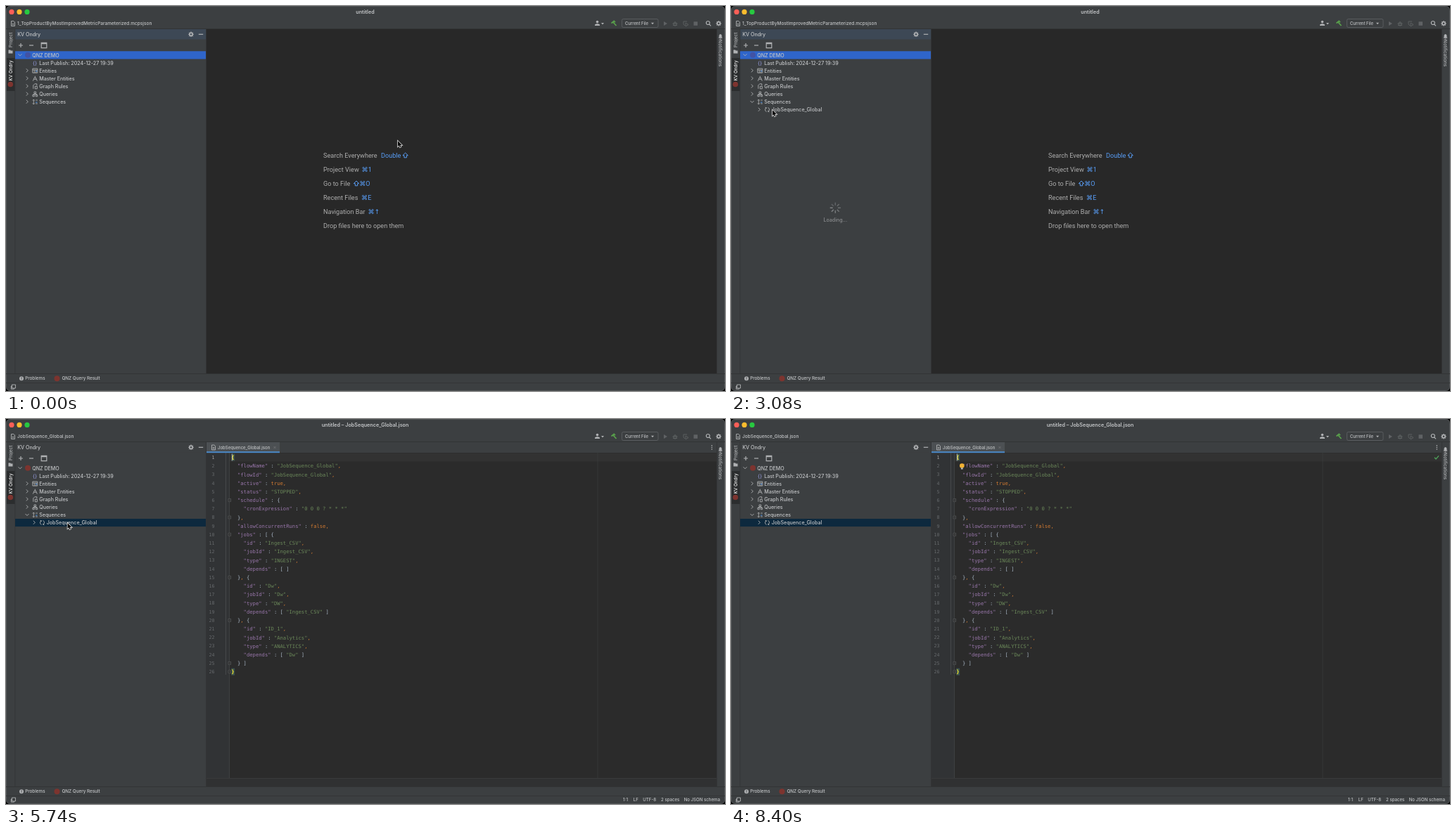
Recreate the animation shown at these times as an HTML page with a canvas. Size 1022 by 548 pixels, loop 8.47 s.

```html
<!DOCTYPE html>
<html lang="en">
<head>
<meta charset="utf-8">
<title>Job sequence browser</title>
<style>
  html, body { margin: 0; width: 100%; height: 100%; overflow: hidden; background: #000; }
  canvas { display: block; }
</style>
</head>
<body>
<canvas id="stage" width="1022" height="548"></canvas>
<script>
const ctx = document.getElementById('stage').getContext('2d');
const LOOP = 8470;
const UI = 'Inter, "Open Sans", sans-serif';
const HINT = 'Roboto, "DejaVu Sans", sans-serif';
const MONO = '"DejaVu Sans Mono", monospace';
const PANEL = '#3c3f41', TEXT = '#c3c5c7', ICON = '#afb1b3', DIM = '#5f6264', RED = '#7d342f', BLUE = '#2f65ca';

// When each state of the window begins or ends, in ms.
const AT = { sequences: 2450, job: 4200, select: 5320, collapse: 5600, editor: 5740, check: 6300, bulb: 7070, hideCursor: 7070 };
const LOADING = [[2450, 3850, .85], [4200, 4900, .85], [5880, 6580, .45]];
const CLICKS = [[2100, 2310], [4130, 4340], [5250, 5330], [5530, 5600]];
const CURSOR = [
  [0, 557, 192], [770, 557, 192], [1610, 25, 142], [1680, 25, 142], [1960, 29, 133],
  [2450, 29, 133], [2940, 59, 148], [3360, 59, 148], [3850, 39.5, 149],
  [4900, 39.5, 149], [5320, 85.5, 147.5], [5530, 85.5, 147.5], [5740, 87.5, 148], [LOOP, 87.5, 148]
];

const CODE = `{
  "flowName" : "JobSequence_Global",
  "flowId" : "JobSequence_Global",
  "active" : true,
  "status" : "STOPPED",
  "schedule" : {
    "cronExpression" : "0 0 0 ? * * *"
  },
  "allowConcurrentRuns" : false,
  "jobs" : [ {
    "id" : "Ingest_CSV",
    "jobId" : "Ingest_CSV",
    "type" : "INGEST",
    "depends" : [ ]
  }, {
    "id" : "Dw",
    "jobId" : "Dw",
    "type" : "DW",
    "depends" : [ "Ingest_CSV" ]
  }, {
    "id" : "ID_1",
    "jobId" : "Analytics",
    "type" : "ANALYTICS",
    "depends" : [ "Dw" ]
  } ]
}`.split('\n');

function rect(x, y, w, h, color) {
  ctx.fillStyle = color;
  ctx.fillRect(x, y, w, h);
}

function disc(x, y, r, color) {
  ctx.fillStyle = color;
  ctx.beginPath();
  ctx.arc(x, y, r, 0, 7);
  ctx.fill();
}

function icon(x, y, d, color = ICON, { fill = false, width = .9 } = {}) {
  ctx.save();
  ctx.translate(x, y);
  const path = new Path2D(d);
  ctx.lineWidth = width;
  ctx.fillStyle = ctx.strokeStyle = color;
  fill ? ctx.fill(path) : ctx.stroke(path);
  ctx.restore();
}

// y is the vertical middle of the capitals.
function text(str, x, y, { size = 7.1, color = TEXT, font = UI, weight = 500, align = 'left' } = {}) {
  ctx.font = `${weight} ${size}px ${font}`;
  ctx.fillStyle = color;
  ctx.textAlign = align;
  ctx.fillText(str, x, y + size * .36);
}

function turnedText(str, x, y, angle, color) {
  ctx.save();
  ctx.translate(x, y);
  ctx.rotate(angle);
  text(str, 0, 0, { size: 6.3, color, align: 'center' });
  ctx.restore();
}

function gear(x, y) {
  for (let i = 0; i < 8; i++) {
    const a = i * Math.PI / 4, c = Math.cos(a), s = Math.sin(a);
    icon(x, y, `M${c * 2} ${s * 2}L${c * 3.7} ${s * 3.7}`, ICON, { width: 1.3 });
  }
  ctx.lineWidth = 1.5;
  ctx.beginPath();
  ctx.arc(x, y, 2, 0, 7);
  ctx.strokeStyle = ICON;
  ctx.stroke();
}

function chevron(x, y, open) {
  icon(x, y, open ? 'M-2.5-1.2L0 1.3 2.5-1.2' : 'M-1.2-2.5L1.3 0-1.2 2.5');
}

function braces(x, y) {
  text('{}', x, y, { size: 7, color: '#8e93d1', align: 'center' });
}

function drawChrome(editing) {
  rect(0, 0, 1022, 548, '#000');
  ctx.beginPath();
  ctx.roundRect(.5, .5, 1021, 547, 5);
  ctx.fillStyle = PANEL;
  ctx.fill();
  ctx.lineWidth = 1;
  ctx.strokeStyle = '#505355';
  ctx.stroke();
  ['#ff5f57', '#febc2e', '#28c840'].forEach((c, i) => disc(8 + 11 * i, 8.4, 3.6, c));
  text(editing ? 'untitled – JobSequence_Global.json' : 'untitled', 510.5, 8.3,
    { size: 7.2, weight: 600, align: 'center' });

  icon(10, 25, 'M-2.5-3.5H1L2.5-2V3.5H-2.5ZM-1.2 0H1.2M-1.2 1.7H1.2');
  text(editing ? 'JobSequence_Global.json' : '1_TopProductByMostImprovedMetricParameterized.mcpsjson', 16, 25, { size: 6.5 });
  disc(840.5, 22.6, 1.8, ICON);
  icon(840.5, 25, 'M-3.5 3V1.5Q0-1 3.5 1.5V3Z', ICON, { fill: true });
  icon(848, 25, 'M-2-1H2L0 1.5Z', ICON, { fill: true });
  icon(864, 25, 'M-3.5-.5L.2-3.5 2-1.8M-1-1.8L3.5 3', '#59a04b', { width: 1.7 });
  ctx.strokeStyle = '#606366';
  ctx.lineWidth = .8;
  ctx.beginPath();
  ctx.roundRect(875.5, 18.5, 51.5, 12, 2);
  ctx.stroke();
  text('Current File', 880, 24.7, { size: 5.9 });
  icon(919, 24.7, 'M-2-1H2L0 1.5Z', ICON, { fill: true });
  icon(937, 25, 'M-2-3L3 0-2 3Z', DIM, { fill: true });
  icon(951, 25, 'M-2-1H2V2L0 3.3-2 2ZM-3.5 0H3.5M-3 2.5H3M-1.5-1.2Q0-4 1.5-1.2', DIM);
  icon(966, 25, 'M-3-3H2M-3-3V1L-1 3M0-1L4 1.5 0 4Z', DIM);
  rect(977.5, 22.3, 5.5, 5.5, DIM);
  icon(998.3, 24.5, 'M2-.5A2.5 2.5 0 1 1-3-.5A2.5 2.5 0 1 1 2-.5M1.2 1.3L3.7 3.8', ICON, { width: 1.2 });
  gear(1013, 24.8);

  rect(0, 32, 1022, 1, '#323435');
  rect(0, 523, 1022, 1, '#323435');
  rect(0, 536, 1022, 1, '#333536');
  rect(12.5, 33, .8, 490, '#323435');
  rect(1, 74, 11.5, 47, '#2b2d2e');
  turnedText('Project', 6.3, 48.3, -Math.PI / 2, '#b4b6b8');
  icon(6.5, 65, 'M-3-2.5H-.5L.5-1.5H3V2.5H-3Z', ICON, { fill: true });
  turnedText('KV Ondry', 6.3, 92, -Math.PI / 2, '#f0f0f0');
  disc(6.3, 111.5, 3.8, RED);
  rect(1010, 33, .8, 490, '#323435');
  icon(1015.5, 43.5, 'M-3 2.2L-2 1V-1Q-2-3.5 0-3.5T2-1V1L3 2.2ZM-1 3H1V4H-1Z', ICON, { fill: true });
  turnedText('Notifications', 1015.5, 67, Math.PI / 2, '#b4b6b8');

  disc(22, 530.2, 3, ICON);
  rect(21.6, 528.3, .9, 2.4, PANEL);
  rect(21.6, 531.3, .9, .9, PANEL);
  text('Problems', 27.2, 530.2, { size: 6.3 });
  disc(72.5, 530.2, 4, RED);
  text('QNZ Query Result', 79.5, 530.2, { size: 6.3 });
  icon(10.5, 542, 'M-2-3H3V2H-2ZM-2-1H-3.2V3.2H1V2');
}

function drawTree(t, editing) {
  rect(13.3, 33, 271, 14.5, editing ? PANEL : '#3d4855');
  text('KV Ondry', 16.2, 40.5);
  gear(263, 40.3);
  icon(277, 40.3, 'M-3.2 0H3.2', ICON, { width: 1.2 });
  icon(21, 56, 'M-3 0H3M0-3V3', ICON, { width: 1.2 });
  icon(36, 56, 'M-3 0H3', ICON, { width: 1.2 });
  icon(54, 56, 'M-3.8-3.7H3.8V3.7H-3.8ZM-3.8-2.3H3.8', ICON, { width: 1.2 });
  rect(284.3, 33, .8, 490, '#2f3132');

  const selected = t >= AT.select;
  if (!selected) rect(13, 64.3, 271, 11.2, BLUE);
  else rect(13, 142, 271, 11.1, editing ? '#0d293e' : BLUE);

  chevron(20, 69.5, true);
  disc(31, 69.8, 4, selected ? RED : '#4153a5');
  text('QNZ DEMO', 37.2, 70);
  braces(41, 81);
  text('Last Publish: 2024-12-27 19:39', 47.2, 81.2);

  const glyphs = [
    'M-3.5-3H3.5V3H-3.5ZM-3.5-1H3.5M-1-1V3M1.3-1V3',
    'M0-3.5V-1.5M-3 3.5L-.8-1.5H.8L3 3.5M-1.7 1H1.7',
    'M-2.5 3.5V-1.5L-.5-3.5H2.5V-1M0 0H3V3.5H0Z',
    'M-1.3-3.3H1.3V-1H-1.3ZM-3.4 1H-1V3.3H-3.4ZM1 1H3.4V3.3H1ZM0-1V0M-2.2 1V0H2.2V1',
    'M-2-3.5V3.5M-3.5-2L-2-3.5-.5-2M-3.5 2L-2 3.5-.5 2M1-2.5H3.5M1 2.5H3.5'
  ];
  ['Entities', 'Master Entities', 'Graph Rules', 'Queries', 'Sequences'].forEach((name, i) => {
    const y = 92.1 + 11.1 * i;
    chevron(30, y - .3, i === 4 && t >= AT.sequences);
    icon(41.3, y, glyphs[i]);
    if (i === 0 || i === 4) rect(42, y, 2.5, 1.2, '#4b86cf');
    text(name, 47.2, y);
  });

  if (t >= AT.sequences) {
    const open = t >= AT.job && t < AT.collapse;
    chevron(40, 147.3, open);
    icon(51.5, 147.5, 'M-1 3A3.2 3.2 0 0 1-1.6-2.6M-2.8-3.2L-1.2-2.8-1.6-1.2M1-3A3.2 3.2 0 0 1 1.6 2.6M2.8 3.2L1.2 2.8 1.6 1.2');
    text('JobSequence_Global', 57.7, 147.6);
    if (open) {
      braces(61, 158.6);
      text('Cron: 0 0 0 ? * * *', 67.3, 158.7);
      braces(61, 169.6);
      text('Concurrent: false', 67.3, 169.8);
    }
  }

  const loading = LOADING.find(([from, to]) => t >= from && t < to);
  if (loading) drawSpinner(t, loading[2]);
}

function drawSpinner(t, alpha) {
  const step = Math.floor(t / 105) % 8;
  for (let i = 0; i < 8; i++) {
    const a = i * Math.PI / 4, c = Math.cos(a), s = Math.sin(a);
    ctx.globalAlpha = alpha * (.45 + .45 * ((i - step + 8) % 8) / 7);
    icon(148.3, 287.3, `M${c * 3.6} ${s * 3.6}L${c * 7.6} ${s * 7.6}`, '#94979a', { width: 1.5 });
  }
  ctx.globalAlpha = alpha;
  text('Loading...', 148.3, 304.2, { color: '#96999b', align: 'center' });
  ctx.globalAlpha = 1;
}

// Draws a shortcut, with the shift key as an outlined arrow.
function shortcut(keys, x, y) {
  const style = { size: 9.14, font: HINT, weight: 400, color: '#589df6' };
  for (const part of keys.split(/(⇧)/)) {
    if (part === '⇧') {
      icon(x + 4, y, 'M0-3.5L3.7.2H1.7V3.3H-1.7V.2H-3.7Z', style.color, { width: 1 });
      x += 8.2;
    } else {
      text(part, x, y, style);
      x += ctx.measureText(part).width;
    }
  }
}

function drawHints() {
  rect(285, 33, 725, 490, '#282828');
  const hints = [['Search Everywhere', 'Double ⇧', 533], ['Project View', '⌘1', 505.5], ['Go to File', '⇧⌘O', 494],
    ['Recent Files', '⌘E', 505], ['Navigation Bar', '⌘↑', 514.5], ['Drop files here to open them', '', 0]];
  hints.forEach(([label, keys, x], i) => {
    const y = 212.5 + 20 * i;
    text(label, 451, y, { size: 9.14, font: HINT, weight: 400, color: '#adadad' });
    shortcut(keys, x, y);
  });
}

function drawEditor(t) {
  const left = 320.3, lineY = i => 54.5 + 12.21 * i;
  rect(285, 48, 725, 475, '#2b2b2b');
  rect(285, 48, 32.5, 463, '#313335');
  rect(317.5, 48.5, 692.5, 12, '#323232');
  rect(312, 48, .7, 316, '#515355');
  rect(317.3, 48, .7, 463, '#47494a');
  rect(840.6, 48, .8, 463, '#3b3d3e');
  rect(285, 511, 725, 12, '#303132');
  rect(285, 511, 725, .8, '#3b3d3e');

  rect(285, 33, 104, 15, '#4c5053');
  rect(285, 46.2, 104, 2, '#4a88c7');
  icon(295, 40.5, 'M-2.5-3.5H1L2.5-2V3.5H-2.5ZM-1.2 0H1.2M-1.2 1.7H1.2');
  text('JobSequence_Global.json', 301, 40.5, { size: 6 });
  icon(382, 40.5, 'M-1.5-1.5L1.5 1.5M1.5-1.5L-1.5 1.5', '#777a7c', { width: .7 });
  for (let i = -1; i < 2; i++) disc(1003.3, 40.5 + 2.6 * i, .8, ICON);

  const style = { size: 7.2, font: MONO, weight: 400 };
  ctx.font = `${style.size}px ${MONO}`;
  const advance = ctx.measureText('0').width;
  CODE.forEach((line, i) => {
    const y = lineY(i), edge = i === 0 || i === CODE.length - 1;
    text(i + 1, 296.5, y, { ...style, size: 6.6, color: i ? '#66696c' : '#a4a3a3', align: 'right' });
    if (edge) rect(left, y - 5, advance + .5, 10, '#3b514d');
    for (const { 0: token, index } of line.matchAll(/"[^"]*"|true|false|\S/g)) {
      const key = line.slice(index + token.length).startsWith(' :');
      const color = edge ? '#ffef28' : token[0] === '"' ? (key ? '#9876aa' : '#6a8759')
        : /true|false|,/.test(token) ? '#cc7832' : '#a9b7c6';
      text(token, left + index * advance, y, { ...style, color, weight: edge ? 700 : 400 });
    }
  });
  for (const n of [6, 8, 10, 15, 20, 25, 26]) {
    const y = lineY(n - 1);
    rect(315.5, y - 2.4, 4.6, 4.8, '#2b2b2b');
    icon(317.8, y, 'M-1.9-2H1.9V2H-1.9ZM-1 0H1', '#616466', { width: .6 });
  }
  rect(left + .6, 49.5, .9, 10, '#bbbbbb');

  if (t >= AT.bulb) {
    disc(328.3, 66.5, 3.3, '#f2b233');
    rect(326.9, 69.4, 2.8, 2.2, '#b9bbbc');
  }
  if (t >= AT.check) icon(1003, 54.7, 'M-3 0L-1 2.2 3-2.3', '#4fa05a', { width: 1.4 });

  [['1:1', 877], ['LF', 891.7], ['UTF-8', 905.3], ['2 spaces', 931], ['No JSON schema', 963.7]]
    .forEach(([label, x]) => text(label, x, 542.2, { size: 6.1 }));
}

function cursorAt(t) {
  const i = CURSOR.findIndex(key => key[0] > t);
  const [t0, x0, y0] = CURSOR[i - 1], [t1, x1, y1] = CURSOR[i];
  const p = (t - t0) / (t1 - t0), e = p * p * (3 - 2 * p);
  return [x0 + (x1 - x0) * e, y0 + (y1 - y0) * e];
}

function drawCursor(x, y) {
  const arrow = 'M0 0V8L1.8 6.4 3 9.2 4.5 8.5 3.3 5.9H5.8Z';
  icon(x, y, arrow, '#e8e8e8', { width: 1.5 });
  icon(x, y, arrow, '#0a0a0a', { fill: true });
}

function draw(now) {
  const t = now % LOOP, editing = t >= AT.editor;
  const [x, y] = cursorAt(t);
  drawChrome(editing);
  drawTree(t, editing);
  editing ? drawEditor(t) : drawHints();
  if (CLICKS.some(([from, to]) => t >= from && t < to)) {
    ctx.globalAlpha = .85;
    disc(x - .3, y + .8, 8, '#1d5ca9');
    ctx.globalAlpha = 1;
  }
  if (t < AT.hideCursor) drawCursor(x, y);
}

const start = performance.now();
function tick() {
  draw(performance.now() - start);
  requestAnimationFrame(tick);
}
tick();
</script>
</body>
</html>
```
